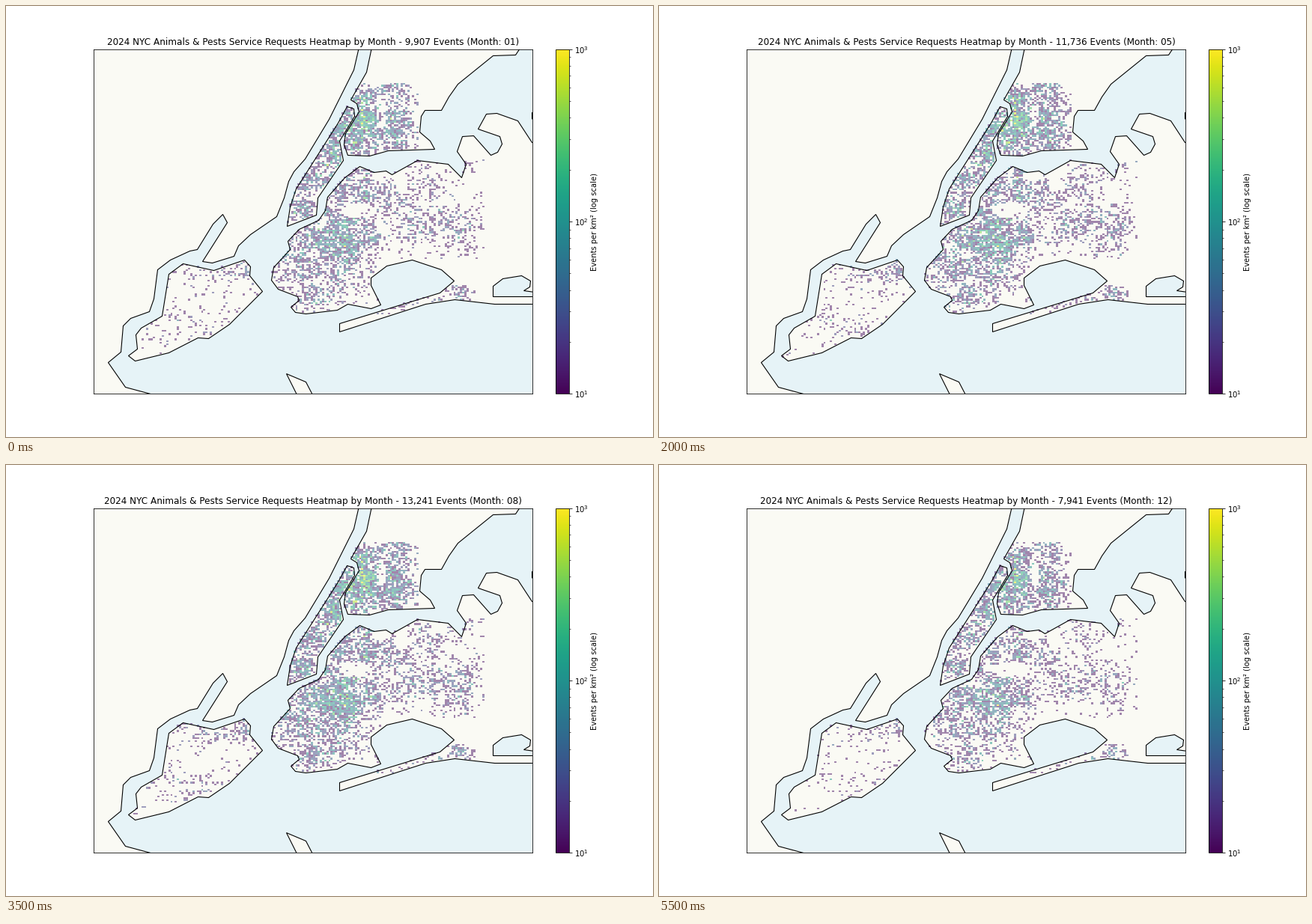
Write a matplotlib script that moves like this. It is 864 px wide and 576 px high and loops after 6 s.

```python
import numpy as np
import matplotlib.pyplot as plt
from matplotlib.animation import FuncAnimation
from matplotlib.cm import ScalarMappable
from matplotlib.colors import LogNorm
from matplotlib.patches import Polygon
from matplotlib.path import Path

W, H, DPI = 864, 576, 72
LEFT, RIGHT, TOP, BOTTOM = 117.4, 703.4, 57.6, 518.4
BINS = 200
PER_EVENT = 12.5  # events per km² for one event in a cell
LAND, WATER = "#fafaf4", "#e6f3f7"
MONTHLY_EVENTS = [9907, 8742, 9157, 9836, 11736, 11792,
                  12852, 13241, 12317, 11938, 9214, 7941]

plt.rcParams["font.family"] = "DejaVu Sans"

# Key points of the coasts in stage pixels, running past the map frame.
WEST = [(472, 50), (464, 85), (431, 151), (399, 204), (384, 221), (377, 234),
        (371, 256), (361, 281), (326, 305), (310, 320), (304, 334), (275, 343),
        (262, 341), (295, 289), (289, 278), (276, 291), (255, 325), (245, 327),
        (219, 339), (202, 352), (197, 391), (191, 408), (166, 417), (156, 427),
        (153, 462), (136, 476), (159, 509), (200, 520), (100, 530), (100, 50)]
BRONX = [(489, 50), (481, 88), (460, 125), (468, 130), (471, 141), (453, 170),
         (451, 185), (456, 199), (485, 200), (510, 193), (572, 191), (566, 180),
         (552, 168), (554, 147), (559, 139), (581, 139), (591, 121), (603, 104),
         (650, 66), (680, 65), (690, 50)]
MANHATTAN = [(375, 294), (379, 268), (387, 244), (443, 156), (455, 134),
             (464, 137), (465, 147), (445, 180), (450, 206), (416, 256),
             (414, 279)]
NORTH_SHORE = [(391, 298), (417, 286), (426, 273), (429, 255), (452, 229),
               (472, 214), (491, 222), (507, 220), (515, 225), (549, 206),
               (590, 211), (608, 229), (614, 211), (602, 194), (609, 174),
               (624, 173), (647, 199), (656, 195), (662, 184), (659, 174),
               (630, 164), (641, 144), (655, 143), (683, 153), (702, 182)]
SOUTH_SHORE = [(720, 398), (652, 398), (599, 392), (560, 398), (445, 435),
               (445, 424), (579, 383), (598, 367), (581, 352), (542, 339),
               (508, 347), (487, 363), (487, 373), (500, 399), (487, 404),
               (456, 398), (442, 406), (400, 411), (386, 409), (380, 402),
               (391, 393), (389, 388), (363, 378), (354, 366), (357, 349),
               (379, 325), (376, 314)]
LONG_ISLAND = NORTH_SHORE + [(720, 184)] + SOUTH_SHORE
STATEN = [(163, 467), (172, 474), (217, 463), (256, 443), (270, 444), (298, 425),
          (342, 381), (325, 360), (326, 348), (318, 339), (277, 353), (236, 344),
          (217, 358), (208, 414), (180, 430), (173, 439), (175, 458)]
HOOK = [(374, 491), (400, 502), (413, 527), (392, 527)]
EAST_TIP = [(710, 140), (702, 142), (702, 150), (710, 160)]
POND = [(650, 388), (650, 374), (663, 364), (688, 360), (700, 367), (699, 375),
        (691, 380), (720, 384), (720, 388)]

# Coast, bounding box, base rate and hotspots (x, y, spread x, spread y, rate).
BOROUGHS = [
    (BRONX, (440, 550, 103, 205), 0.15,
     [(476, 160, 15, 20, 8), (518, 145, 13, 28, 1.8)]),
    (MANHATTAN, (370, 470, 130, 300), 0.5,
     [(446, 176, 14, 27, 7), (398, 258, 13, 24, 1.2)]),
    (LONG_ISLAND, (350, 500, 205, 412), 0.1,
     [(440, 312, 22, 22, 4.5), (470, 240, 22, 14, 1.3), (395, 352, 34, 24, 0.8),
      (420, 385, 20, 18, 0.6), (490, 315, 16, 14, 1)]),
    (LONG_ISLAND, (500, 638, 205, 338), 0.12,
     [(510, 254, 12, 16, 1), (570, 294, 34, 16, 0.6), (552, 240, 14, 16, 0.3)]),
    (LONG_ISLAND, (495, 626, 374, 412), 0.2, [(609, 382, 9, 6, 1)]),
    (STATEN, (160, 345, 335, 475), 0.05,
     [(272, 354, 26, 9, 0.25), (318, 350, 8, 10, 1), (240, 432, 26, 9, 0.12)]),
]
PARKS = [(502, 146, 6, 14), (470, 274, 24, 10), (412, 331, 8, 7),
         (528, 232, 9, 16), (500, 228, 14, 7)]

xs = LEFT + (np.arange(BINS) + 0.5) * (RIGHT - LEFT) / BINS
ys = TOP + (np.arange(BINS) + 0.5) * (BOTTOM - TOP) / BINS
X, Y = np.meshgrid(xs, ys)
CELLS = np.column_stack([X.ravel(), Y.ravel()])


def inside(coast, box):
    x0, x1, y0, y1 = box
    land = Path(coast).contains_points(CELLS).reshape(X.shape)
    return land & (X > x0) & (X < x1) & (Y > y0) & (Y < y1)


def bump(x, y, rx, ry):
    return np.exp(-(((X - x) / rx) ** 2 + ((Y - y) / ry) ** 2) / 2)


def blurred(noise, width=2):
    kernel = np.exp(-(np.arange(-6, 7) / width) ** 2 / 2)
    for axis in (0, 1):
        noise = np.apply_along_axis(np.convolve, axis, noise, kernel, "same")
    return noise / noise.std()


def event_share():
    """Each cell's share of the city's events, with blocks and hot addresses."""
    rate = np.zeros(X.shape)
    for coast, box, base, spots in BOROUGHS:
        level = base + sum(s * bump(x, y, rx, ry) for x, y, rx, ry, s in spots)
        rate += level * inside(coast, box)
    for x, y, rx, ry in PARKS:
        rate[((X - x) / rx) ** 2 + ((Y - y) / ry) ** 2 < 1] *= 0.05
    rng = np.random.default_rng(11)
    rate *= np.exp(0.55 * blurred(rng.normal(size=X.shape))
                   + 1.1 * rng.normal(size=X.shape))
    return rate / rate.sum()


SHARE = event_share()


def density(month):
    rng = np.random.default_rng([2024, month])
    events = rng.poisson(SHARE * MONTHLY_EVENTS[month - 1])
    return np.ma.masked_equal(events, 0) * PER_EVENT


fig = plt.figure(figsize=(W / DPI, H / DPI), dpi=DPI, facecolor="white")
ax = fig.add_axes([LEFT / W, 0.1, (RIGHT - LEFT) / W, 0.8], facecolor=WATER)
norm = LogNorm(10, 1000)
heat = ax.imshow(density(1), cmap="viridis", norm=norm, alpha=0.5,
                 interpolation="nearest", aspect="auto", zorder=2,
                 extent=(LEFT, RIGHT, BOTTOM, TOP))

for coast in (WEST, BRONX, MANHATTAN, LONG_ISLAND, STATEN, HOOK, EAST_TIP, POND):
    outline = np.add(coast, 0.5)
    fill = WATER if coast is POND else LAND
    ax.add_patch(Polygon(outline, fc=fill, ec="none", zorder=1))
    ax.add_patch(Polygon(outline, fill=False, ec="black", lw=1.1, zorder=3))

ax.set(xlim=(LEFT, RIGHT), ylim=(BOTTOM, TOP), xticks=[], yticks=[])
title = ax.set_title("", fontsize=12)

bar = fig.colorbar(ScalarMappable(norm, "viridis"),
                   cax=fig.add_axes([0.85, 0.1, 0.02, 0.8]))
bar.set_label("Events per km² (log scale)")


def update(frame):
    month = frame + 1
    heat.set_data(density(month))
    title.set_text("2024 NYC Animals & Pests Service Requests Heatmap by Month"
                   f" - {MONTHLY_EVENTS[frame]:,} Events (Month: {month:02d})")
    return heat, title


anim = FuncAnimation(fig, update, frames=len(MONTHLY_EVENTS), interval=500,
                     repeat=True, repeat_delay=0)
plt.show()
```
